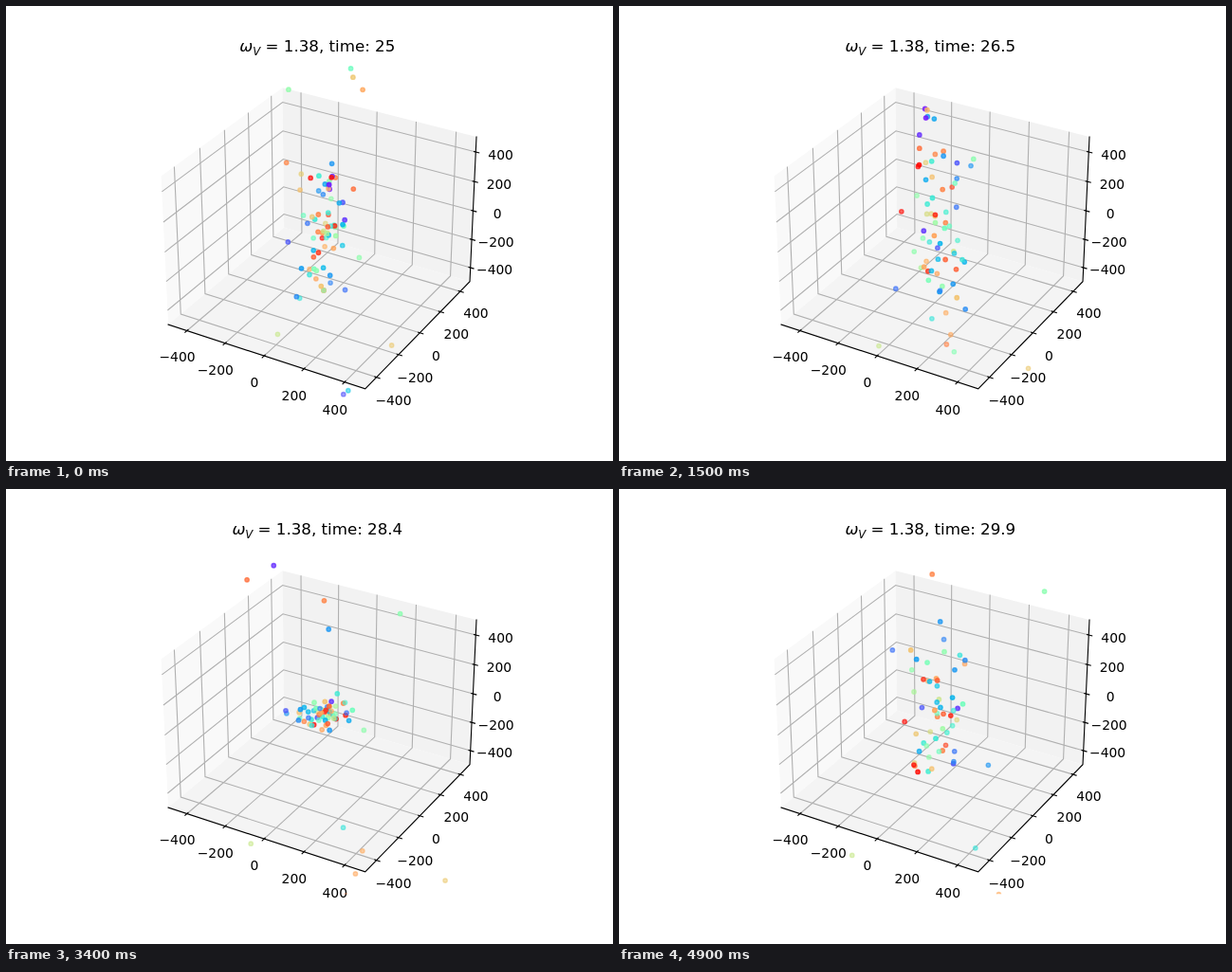
These frames come from a looping animation (640x480 px, 5 s). An HTML page:

```html
<!DOCTYPE html>
<html lang="en">
<head>
<meta charset="utf-8">
<title>Particle cloud</title>
<style>
  html, body { margin: 0; width: 100%; height: 100%; overflow: hidden; background: #fff; }
  svg { display: block; width: 640px; height: 480px; }
  text { font-family: "DejaVu Sans", sans-serif; font-size: 13.89px; text-anchor: middle; white-space: pre; }
  .title { font-size: 16.67px; }
  .grid { stroke: #b0b0b0; stroke-width: 1.11; fill: none; }
  .axis { stroke: #000; stroke-width: 1.11; fill: none; stroke-linecap: square; }
</style>
</head>
<body>
<svg id="stage" viewBox="0 0 640 480">
  <clipPath id="box"><rect x="143.2" y="57.6" width="369.6" height="369.6"/></clipPath>
  <g id="axes"></g>
  <g id="dots" clip-path="url(#box)" stroke-width="1.39"></g>
  <text class="title" x="328.3" y="48.4"><tspan font-style="italic">ω</tspan><tspan font-style="italic" font-size="11.67" dy="3.2">V</tspan><tspan id="clock" dy="-3.2"></tspan></text>
</svg>
<script>
const NS = 'http://www.w3.org/2000/svg';
const axes = document.getElementById('axes');
const dotLayer = document.getElementById('dots');
const clock = document.getElementById('clock');

// Half sizes of the plot box
const H = 0.5953, V = 0.4465;

// Perspective view: elevation 30°, azimuth -60°, eye distance 10
function project(x, y, z) {
  const k = 1997.8 / (10 - (0.433 * x - 0.75 * y + 0.5 * z));
  return [333 + k * (0.866 * x + 0.5 * y),
          237.4 - k * (-0.25 * x + 0.433 * y + 0.866 * z)];
}

function add(parent, name, attrs, text) {
  const el = document.createElementNS(NS, name);
  for (const key in attrs) el.setAttribute(key, attrs[key]);
  if (text !== undefined) el.textContent = text;
  parent.appendChild(el);
  return el;
}

const points = list => list.map(p => project(...p).map(n => n.toFixed(2)).join()).join(' ');
const pane = (fill, ...list) => add(axes, 'polygon', { points: points(list), fill });
const line = (cls, ...list) => add(axes, 'polyline', { points: points(list), class: cls });

function label(value, ...at) {
  const [x, y] = project(...at);
  add(axes, 'text', { x: x.toFixed(2), y: Math.round(y + 11) }, String(value).replace('-', '−'));
}

function drawAxes() {
  pane('#f9f9f9', [-H, -H, -V], [-H, H, -V], [-H, H, V], [-H, -H, V]);
  pane('#f2f2f2', [-H, H, -V], [H, H, -V], [H, H, V], [-H, H, V]);
  pane('#f4f4f4', [-H, -H, -V], [H, -H, -V], [H, H, -V], [-H, H, -V]);

  const inner = H - 0.0095, outer = H + 0.019;
  const far = H + 0.0985, low = -V - 0.074;
  for (let value = -400; value <= 400; value += 200) {
    const a = H * value / 500, c = V * value / 500;
    line('grid', [a, -H, -V], [a, H, -V], [a, H, V]);
    line('grid', [H, a, -V], [-H, a, -V], [-H, a, V]);
    line('grid', [-H, -H, c], [-H, H, c], [H, H, c]);
    line('axis', [a, -inner, -V], [a, -outer, -V]);
    line('axis', [inner, a, -V], [outer, a, -V]);
    line('axis', [inner, H, c], [outer, H, c]);
    label(value, a, -far, low);
    label(value, far, a, low);
    label(value, far, far, c);
  }
  line('axis', [-H, -H, -V], [H, -H, -V], [H, H, -V], [H, H, V]);
}

let seed = 1380;
function rand() {
  seed = (seed * 1664525 + 1013904223) % 4294967296;
  return seed / 4294967296;
}
const between = (a, b) => a + (b - a) * rand();
const bell = () => (rand() + rand() + rand()) * 2 / 3 - 1;

function rainbow(h) {
  const rgb = [Math.abs(2 * h - 0.5), Math.sin(Math.PI * h), Math.cos(Math.PI * h / 2)];
  return `rgb(${rgb.map(n => Math.round(255 * Math.min(1, n)))})`;
}

const dots = [];
function addDot(hue, alpha, place) {
  const color = rainbow(hue);
  const el = add(dotLayer, 'circle', { r: 2.2, fill: color, stroke: color,
    'fill-opacity': alpha, 'stroke-opacity': alpha });
  dots.push({ el, place });
}

function addDrifter(time, x, y, vx, vy, hue) {
  addDot(hue, vy < 0 ? 0.75 : 0.55, t => [x + vx * (t - time), y + vy * (t - time)]);
}

// Particles thrown out of one end of the cloud together
function addBurst(count, time, y, slow, fast) {
  for (let i = 0; i < count; i++) {
    addDrifter(time, 335, y, between(-19, 19), between(slow, fast), rand());
  }
}

// Trapped particles swing sideways and meet in a flat disc at time 28.4
function addTrapped(i, count) {
  const level = 2 * (i + rand()) / count - 1;
  const height = 0.48 * Math.sign(level) * Math.abs(level) ** 1.15;
  const speed = 0.95 - 0.33 * Math.abs(level);
  const phase = between(-0.06, 0.06);
  const swing = () => {
    const size = 0.28 * bell(), rate = between(0.8, 2.2), start = between(0, 6.283);
    const rest = 0.13 * bell();
    return t => rest + size * Math.cos(rate * t + start);
  };
  const sx = swing(), sy = swing();
  addDot(rand(), between(0.55, 0.85),
    t => project(0.015 + sx(t), sy(t), height * Math.sin(speed * (t - 28.4) + phase)));
}

drawAxes();

// Slow drifters, in view for most of the loop: x, y, velocity x, y, hue
[
  [297, 133, -33, -28.6, 0.86],
  [340, 142, -3.5, -18.6, 0.83],
  [341.5, 155, -1, -5.4, 0.2],
  [387, 152, 22, -15.7, 0.52],
  [269, 363.5, -8.3, 8.2, 0.64],
  [441.5, 392, 16.6, 16.2, 0.71],
  [354.5, 342, 16.4, 30.6, 0.77],
  [338, 338.5, 13.5, 14.4, 0.35]
].forEach(row => addDrifter(27.1, ...row));

addBurst(4, 22, 165, -34, -25);
addBurst(2, 22, 300, 35, 39);
addBurst(6, 25.5, 165, -58, -28);
addBurst(3, 25, 300, 30, 45);

const COUNT = 56;
for (let i = 0; i < COUNT; i++) addTrapped(i, COUNT);

let shown = -1;
function render() {
  const step = Math.floor(performance.now() % 5000 / 100);
  if (step !== shown) {
    shown = step;
    const t = (250 + step) / 10;
    clock.textContent = ` = 1.38, time: ${t}`;
    for (const { el, place } of dots) {
      const [x, y] = place(t);
      el.setAttribute('cx', x.toFixed(2));
      el.setAttribute('cy', y.toFixed(2));
    }
  }
  requestAnimationFrame(render);
}
render();
</script>
</body>
</html>
```
